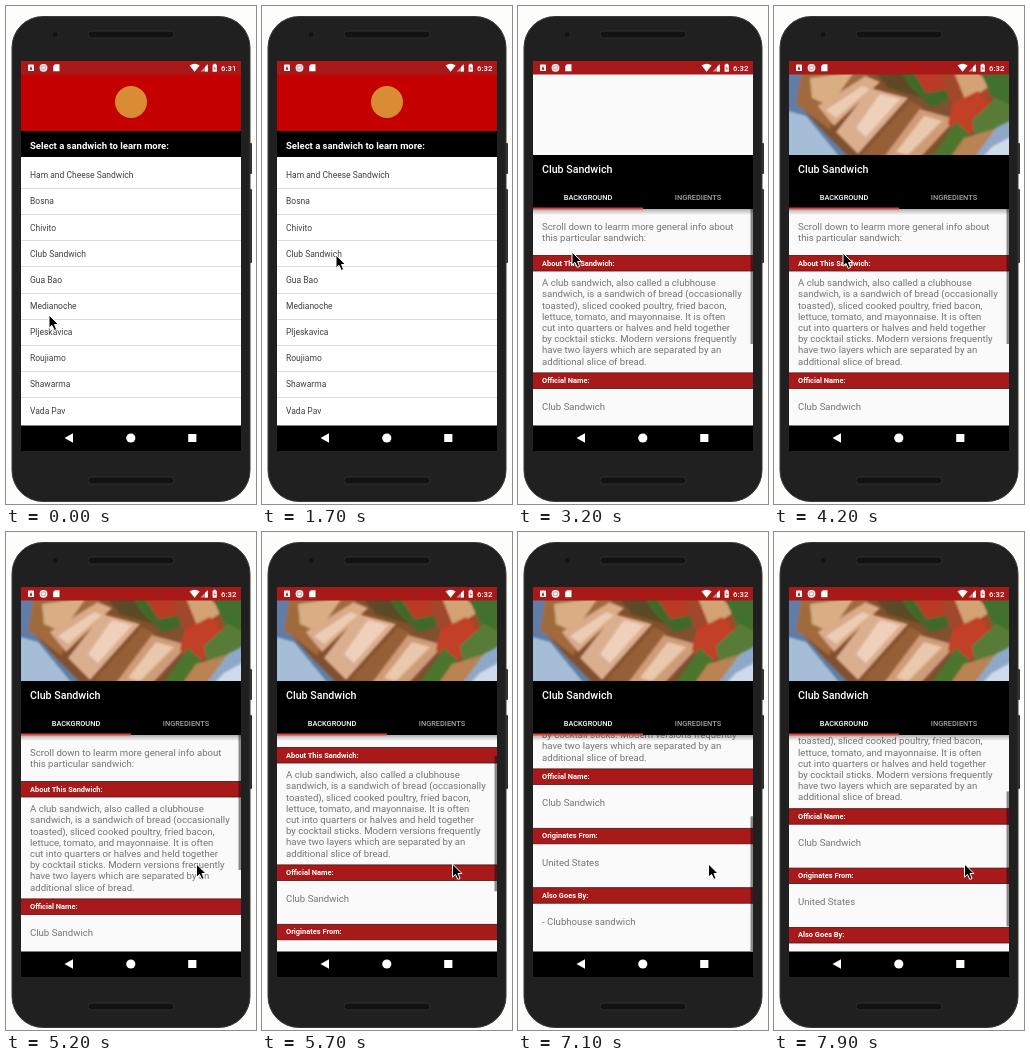
These frames come from a looping animation (250x498 px, 8 s). An HTML page:

```html
<!DOCTYPE html>
<html lang="en">
<head>
<meta charset="utf-8">
<title>Sandwich guide</title>
<style>
  html, body { margin: 0; width: 100%; height: 100%; overflow: hidden; background: #fdfdfb; }
  svg { display: block; width: 250px; height: 498px; font-family: Roboto, "Noto Sans", sans-serif; }
  .row { font-size: 8.5px; fill: #404040; }
  .body { font-size: 9.6px; fill: #747474; }
  .head { font-size: 7.45px; font-weight: 700; fill: #fff; }
  .tab { font-size: 7.4px; font-weight: 500; text-anchor: middle; }
  .clock { font-size: 7.8px; font-weight: 500; fill: #fff; }
</style>
</head>
<body>
<svg viewBox="0 0 250 498">
  <defs>
    <clipPath id="screenClip"><path d="M15 55h220v390h-220z"/></clipPath>
    <clipPath id="paneClip"><path d="M15 203h220v216h-220z"/></clipPath>
    <clipPath id="photoClip"><path d="M15 68h220v81.500h-220z"/></clipPath>
    <linearGradient id="shade" x2="0" y2="1">
      <stop stop-color="#000" stop-opacity=".3"/>
      <stop offset="1" stop-color="#000" stop-opacity="0"/>
    </linearGradient>
    <filter id="soft"><feGaussianBlur stdDeviation="1"/></filter>
  </defs>

  <!-- phone -->
  <g fill="#303030">
    <rect x="242" y="137" width="4" height="31" rx="1"/>
    <rect x="242" y="183" width="4" height="74" rx="1"/>
  </g>
  <rect x="6" y="10.500" width="238" height="485" rx="31" fill="#202020" stroke="#3a3a3a"/>
  <circle cx="49" cy="28.500" r="2.300" fill="#111"/>
  <g fill="#121212" stroke="#353535" stroke-width=".8">
    <rect x="82" y="25" width="86" height="7" rx="3.500"/>
    <rect x="82" y="471" width="86" height="7" rx="3.500"/>
  </g>

  <g clip-path="url(#screenClip)">
    <g id="list">
      <path d="M15 55h220v390h-220z" fill="#fff"/>
      <path d="M15 68h220v57h-220z" fill="#c40000"/>
      <circle cx="125" cy="96" r="16" fill="#d98c34"/>
      <path d="M15 125h220v26h-220z"/>
      <text x="24" y="142.800" font-size="9.500" font-weight="700" fill="#fff">Select a sandwich to learn more:</text>
      <rect id="press" x="15" y="235" width="220" height="26" fill="#d9d9d9"/>
      <g id="rows"></g>
    </g>

    <g id="detail">
      <path d="M15 55h220v390h-220z" fill="#fafafa"/>
      <g clip-path="url(#paneClip)">
        <g id="content"></g>
        <path d="M15 203h220v6h-220z" fill="url(#shade)"/>
        <rect id="thumb" x="232.500" y="203" width="2.500" height="135" opacity=".45"/>
      </g>
      <g id="photo" clip-path="url(#photoClip)">
        <path d="M15 68h220v82h-220z" fill="#80502f"/>
        <g filter="url(#soft)">
          <path d="M10 64h22l-8 34 30 32 24 24h-68z" fill="#5f7da6"/>
          <path d="M10 104l22 6 36 44h-58z" fill="#a6bdd8"/>
          <path d="M28 64h70l-38 34-4 26-34-26z" fill="#a06a3c"/>
          <path d="M36 72l44-6-24 34-18-8z" fill="#d8ae82"/>
          <path d="M44 100l48-30 14 6-46 44z" fill="#d9ab88"/>
          <path d="M52 104l36-24 8 3-34 29z" fill="#ecccb4"/>
          <path d="M62 126l34-44 38 10-50 56z" fill="#dcae90"/>
          <path d="M82 122l24-34 20 5-34 38z" fill="#efd0bb"/>
          <path d="M88 148l48-53 12 6-36 50z" fill="#965f36"/>
          <path d="M110 151l36-48 36 10-38 41z" fill="#cf9c77"/>
          <path d="M122 146l28-36 18 5-34 34z" fill="#e9c9ae"/>
          <path d="M100 64h40l8 28-34-10z" fill="#5d4a26"/>
          <path d="M126 64h46l8 27-22 10-22-20z" fill="#3f6a2b"/>
          <path d="M138 64h28l8 19-22 4z" fill="#b93a25"/>
          <path d="M166 64h72v36l-38 14-24-19z" fill="#a3472c"/>
          <path d="M180 66h24l12 14-24 16z" fill="#d3a274"/>
          <path d="M206 64h32v38l-20-10z" fill="#436f2e"/>
          <path d="M178 98l26-13 16 20-28 27-18-14z" fill="#c23f28"/>
          <path d="M158 150l24-34 14 12-14 24z" fill="#4d742f"/>
          <path d="M198 114l24-22 16 8v18l-36 18z" fill="#597c38"/>
          <path d="M176 152l14-20 34-10-16 28z" fill="#b98353"/>
          <path d="M200 152l22-30 16-8v38z" fill="#8fa8c8"/>
          <path d="M208 152l10-11 20-11v22z" fill="#cfdbe8"/>
        </g>
      </g>
      <path d="M15 149h220v54h-220z"/>
      <text x="24" y="167.400" font-size="10.650" font-weight="500" fill="#fff">Club Sandwich</text>
      <text class="tab" x="70" y="193.500" fill="#fff">BACKGROUND</text>
      <text class="tab" x="180" y="193.500" fill="#a2a2a2">INGREDIENTS</text>
      <path d="M15 201.500h110v2h-110z" fill="#df4040"/>
    </g>

    <!-- status bar -->
    <path d="M15 55h220v13.500h-220z" fill="#a81a1a"/>
    <g fill="#fff">
      <rect x="22" y="58.500" width="6" height="6.500" rx=".8"/>
      <path d="M23.600 63.800l1.400-4 1.400 4z" fill="#a81a1a"/>
      <circle cx="37.500" cy="61.800" r="3.300" fill="#e2aaaa" stroke="#fff" stroke-width="1.200"/>
      <circle cx="37.500" cy="61.800" r="1.300"/>
      <path d="M49 58.300h4.500v7h-6.300v-5.200z"/>
      <path d="M183.600 59.500q5-3.400 10 0l-5 6.200z"/>
      <path d="M201.800 58.300v7.300h-7.300z" opacity=".5"/>
      <path d="M201.800 58.300v7.300h-2.800v-4.500z"/>
      <path d="M206.600 58.700h1v-.9h2.200v.9h1v7h-4.200z"/>
      <path d="M209.200 60l-1.400 2.500h1l-.4 2 1.400-2.600h-1z" fill="#a81a1a"/>
    </g>
    <text id="clock" class="clock" x="215" y="64.700">6:31</text>

    <!-- navigation bar -->
    <path d="M15 419.500h220v25.500h-220z"/>
    <g fill="#fff">
      <path d="M58.500 432l8.500-4.800v9.600z"/>
      <circle cx="124.800" cy="432" r="4.600"/>
      <path d="M182.200 428h8.200v8h-8.200z"/>
    </g>
  </g>

  <path id="cursor" d="M0 0V13.200L3 10.400 5.300 15.400 7.600 14.400 5.500 9.500H9.500Z" stroke="#fff" stroke-width="1"/>
</svg>

<script>
const $ = id => document.getElementById(id);

function add(parent, tag, attrs, text) {
  const el = document.createElementNS("http://www.w3.org/2000/svg", tag);
  for (const key in attrs) el.setAttribute(key, attrs[key]);
  if (text) el.textContent = text;
  parent.append(el);
}

const names = ["Ham and Cheese Sandwich", "Bosna", "Chivito", "Club Sandwich", "Gua Bao",
  "Medianoche", "Pljeskavica", "Roujiamo", "Shawarma", "Vada Pav"];
names.forEach((name, i) => {
  const y = 172.2 + i * 26.15;
  add($("rows"), "text", { class: "row", x: 24, y }, name);
  if (i < 9) add($("rows"), "rect", { x: 15, y: Math.round(y + 9.8), width: 220, height: 1, fill: "#dcdcdc" });
});

function paragraph(y, lines) {
  lines.forEach((line, i) =>
    add($("content"), "text", { class: "body", x: 24, y: y + i * 11.2 }, line));
}

function section(y, title, lines, gap = 26.5) {
  add($("content"), "rect", { x: 14, y: y - 7.5, width: 222, height: 15.5, fill: "#a81a1a", stroke: "#4a1010", "stroke-width": 0.8 });
  add($("content"), "text", { class: "head", x: 24, y: y + 2.5 }, title);
  paragraph(y + gap + 3.4, lines);
}

paragraph(224.2, ["Scroll down to learm more general info about", "this particular sandwich:"]);
section(257, "About This Sandwich:", [
  "A club sandwich, also called a clubhouse",
  "sandwich, is a sandwich of bread (occasionally",
  "toasted), sliced cooked poultry, fried bacon,",
  "lettuce, tomato, and mayonnaise. It is often",
  "cut into quarters or halves and held together",
  "by cocktail sticks. Modern versions frequently",
  "have two layers which are separated by an",
  "additional slice of bread."
], 19.8);
section(374.4, "Official Name:", ["Club Sandwich"]);
section(433.8, "Originates From:", ["United States"]);
section(493.2, "Also Goes By:", ["- Clubhouse sandwich"]);

// Steps: [time, value, ...]
const cursorSteps = [[0, 43, 309], [400, 43, 309], [1400, 74, 249], [2300, 74, 249],
  [3100, 54, 246], [3400, 54, 246], [4000, 69, 247], [4300, 69, 247], [5200, 190.5, 332], [8000, 190.5, 332]];
const scrollSteps = [[0, 0], [5500, 0], [5700, 34], [6300, 107.3], [6500, 130],
  [7400, 130], [7900, 90.2], [8000, 90.2]];

function sample(steps, t) {
  const i = steps.findIndex(step => step[0] > t);
  const a = steps[i - 1], b = steps[i];
  const k = (t - a[0]) / (b[0] - a[0]);
  return a.slice(1).map((v, n) => v + (b[n + 1] - v) * k);
}

const show = (id, on) => $(id).setAttribute("visibility", on ? "inherit" : "hidden");

function draw(t) {
  const [x, y] = sample(cursorSteps, t);
  const [scroll] = sample(scrollSteps, t);
  $("cursor").setAttribute("transform", `translate(${x} ${y})`);
  $("content").setAttribute("transform", `translate(0 ${-scroll})`);
  $("thumb").setAttribute("y", 203 + scroll * 0.625);
  $("clock").textContent = t < 800 ? "6:31" : "6:32";
  show("press", t >= 2800);
  show("detail", t >= 2900);
  show("photo", t >= 3500);
}

const start = performance.now();
function frame() {
  const t = (performance.now() - start) % 8000;
  draw(Math.floor(t / 100) * 100);
  requestAnimationFrame(frame);
}
frame();
</script>
</body>
</html>
```
